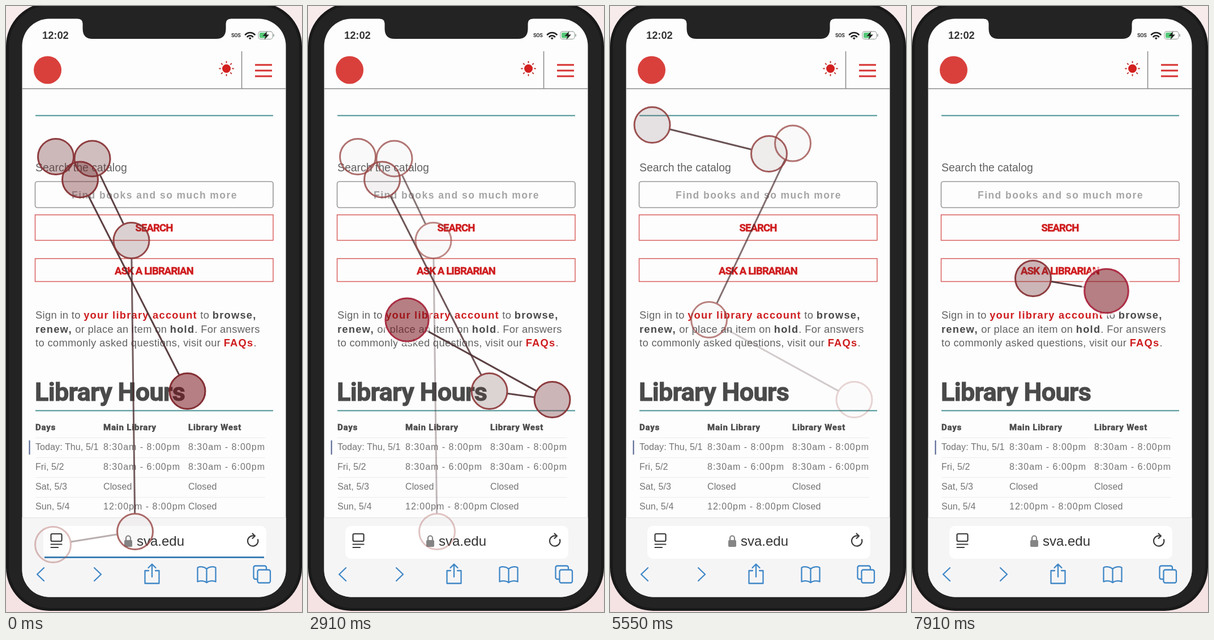
An HTML page for the animation above (8 s loop, 523 by 1070 pixels).

```html
<!DOCTYPE html>
<html lang="en">
<head>
<meta charset="utf-8">
<title>Library page gaze path</title>
<style>
  html, body { margin: 0; width: 100%; height: 100%; overflow: hidden; background: #f6e6e7; }
  svg { display: block; width: 523px; height: 1070px; }
  text { font-family: "Liberation Sans", Arial, sans-serif; fill: #626262; }
  .b { font-weight: 700; }
  .mid { text-anchor: middle; }
  .red { fill: #cf1d1f; }
  .dark { fill: #4a4a4a; }
  .slab { font-family: Roboto, "Liberation Sans", sans-serif; font-weight: 700; stroke-width: .5px; }
  .slab.red { stroke: #cf1d1f; }
  .slab.dark { stroke: #4a4a4a; }
  .title { font-size: 45px; letter-spacing: -.7px; stroke-width: 1px; }
  .button { font-size: 18.5px; letter-spacing: -.85px; }
  .copy { font-size: 18.3px; letter-spacing: .35px; }
  .copy .b { letter-spacing: 1.25px; }
  .head { font-size: 15px; letter-spacing: .8px; }
  .row { font-size: 16px; letter-spacing: 1px; fill: #747474; }
  .row .day, .row .shut { letter-spacing: .1px; }
  .line { fill: none; stroke-linecap: round; stroke-linejoin: round; }
  .blue { stroke: #3f87c6; stroke-width: 2.3; }
  .load { animation: load 8s infinite step-end; }
  @keyframes load { 0% { opacity: 1 } 11.3%, 100% { opacity: 0 } }
</style>
</head>
<body>
<svg viewBox="0 0 523 1070">
  <defs>
    <linearGradient id="bg" x2="0" y2="1">
      <stop offset="0" stop-color="#f8ebec"/><stop offset="1" stop-color="#f5e2e3"/>
    </linearGradient>
    <clipPath id="screen"><rect x="28.500" y="22.500" width="466" height="1021" rx="48"/></clipPath>
  </defs>

  <!-- phone -->
  <rect width="523" height="1070" fill="url(#bg)"/>
  <rect x="0" y="-6" width="523" height="1074" rx="77" fill="#191919"/>
  <rect x="5" y="-1" width="513" height="1064" rx="72" fill="#232323"/>
  <g clip-path="url(#screen)">
    <rect x="28" y="22" width="467" height="1022" fill="#fdfdfd"/>
    <path d="M28 146H495M416.500 80V146" fill="none" stroke="#8d8d8d" stroke-width="1.6"/>

    <!-- page -->
    <circle cx="73.500" cy="113" r="24.500" fill="#d9403c"/>
    <circle cx="389.500" cy="110.500" r="7.500" fill="#d3201f"/>
    <g id="rays" stroke="#bd3a36" stroke-width="2" stroke-linecap="round"></g>
    <path d="M440 104h30M440 114h30M440 124h30" fill="none" stroke="#d6302f" stroke-width="3"/>
    <path d="M52 193.500H472M52 714.500H472" fill="none" stroke="#4b9293" stroke-width="2"/>

    <text x="52" y="292" font-size="19.400">Search the catalog</text>
    <rect x="51.500" y="310" width="420.500" height="46" rx="4" fill="none" stroke="#9b9b9b" stroke-width="1.700"/>
    <text class="b mid" x="262.500" y="340" font-size="17.500" letter-spacing="1.450" style="fill:#a5a5a5">Find books and so much more</text>
    <g fill="none" stroke="#d8625f" stroke-width="1.500">
      <rect x="51.500" y="368.700" width="420.500" height="45"/>
      <rect x="51.500" y="446" width="420.500" height="40.500"/>
    </g>
    <g class="mid button">
      <text class="slab red" x="261.500" y="397.500">SEARCH</text>
      <text class="slab red" x="261.500" y="474">ASK A LIBRARIAN</text>
    </g>

    <g class="copy">
      <text x="52" y="552">Sign in to <tspan class="b red">your library account</tspan> to <tspan class="b dark">browse,</tspan></text>
      <text x="52" y="577"><tspan class="b dark">renew,</tspan> or place an item on <tspan class="b dark">hold</tspan>. For answers</text>
      <text x="52" y="601">to commonly asked questions, visit our <tspan class="b red">FAQs</tspan>.</text>
    </g>

    <text class="slab dark title" x="51" y="697">Library Hours</text>
    <g class="head">
      <text class="slab dark" x="52" y="749">Days</text>
      <text class="slab dark" x="172" y="749">Main Library</text>
      <text class="slab dark" x="322" y="749">Library West</text>
    </g>
    <path d="M52 762.500H458M52 797.500H458M52 832.500H458M52 867.500H458" fill="none" stroke="#ececec"/>
    <path d="M41.500 767V792" fill="none" stroke="#50608f" stroke-width="2"/>
    <g id="hours"></g>

    <!-- browser bar -->
    <rect x="28" y="903" width="467" height="141" fill="#f6f5f6"/>
    <path d="M28 903.500H495" fill="none" stroke="#e2e2e2"/>
    <rect x="66" y="918" width="394" height="58" rx="10" fill="#fff"/>
    <path class="load" d="M68 973.500H456" fill="none" stroke="#3c7fb4" stroke-width="3"/>
    <g class="line" stroke="#3c3c3c" stroke-width="2.200">
      <rect x="79.500" y="932" width="19" height="13" rx="2"/>
      <path d="M79.500 950.500H98.500M79.500 956H92"/>
      <path d="M438 935.500A9.200 9.200 0 1 0 445 942M435.500 931.500L440 935.700L435.500 940"/>
    </g>
    <rect x="209" y="943" width="14" height="12" rx="2" fill="#858585"/>
    <path class="line" d="M212 943V939.500a4 4 0 0 1 8 0V943" stroke="#858585" stroke-width="2.200"/>
    <text x="231" y="953" font-size="24" style="fill:#333">sva.edu</text>
    <g class="line blue">
      <path d="M67 992L55 1003.500L67 1015M156 992L168 1003.500L156 1015"/>
      <path d="M252 997H245.500V1019.500H270.500V997H264M258 1008V986M251.500 992L258 985.500L264.500 992"/>
      <path d="M354.500 994C350 989.500 343 989.500 338.500 991.500V1016.500C343 1014.500 350 1014.500 354.500 1018C359 1014.500 366 1014.500 370.500 1016.500V991.500C366 989.500 359 989.500 354.500 994V1018"/>
      <path d="M444 1012H440.500a3 3 0 0 1-3-3V991.500a3 3 0 0 1 3-3H457a3 3 0 0 1 3 3V995"/>
      <rect x="444.500" y="995.500" width="22.500" height="23" rx="3"/>
    </g>

    <!-- status bar -->
    <text class="b" x="64" y="58" font-size="18.300" style="fill:#333">12:02</text>
    <text class="slab" x="398" y="55" font-size="9" letter-spacing="-.3" style="fill:#333">SOS</text>
    <g class="line" stroke="#222" stroke-width="2.700" stroke-linecap="butt">
      <path d="M423 50.500a11.500 11.500 0 0 1 16.500 0M426.500 54.200a6.700 6.700 0 0 1 9.500 0"/>
    </g>
    <path d="M428.700 56.500a3.800 3.800 0 0 1 5 0L431.200 59.500Z" fill="#222"/>
    <rect x="446" y="45" width="25" height="13.500" rx="4" fill="#fff" stroke="#a9b2ac" stroke-width="1.300"/>
    <rect x="448" y="47" width="13" height="9.500" rx="2" fill="#55c878"/>
    <path d="M473 49.500v4.500" stroke="#a9b2ac" stroke-width="2"/>
    <path d="M461.500 44.500L453.500 53H458.500L456.500 59.500L465 50.500H459.700Z" fill="#222"/>
  </g>
  <path d="M127 18V22.500Q135.500 23 135.500 31V40Q135.500 58 153 58H371Q388.500 58 388.500 40V31Q388.500 23 397 22.500V18Z" fill="#232323"/>

  <g id="links" stroke="#4b2d30" stroke-width="3"></g>
  <g id="spots"></g>
</svg>
<script>
const LOOP = 8000, RADIUS = 31.5, POP = 300;
const $ = id => document.getElementById(id);

function add(parent, tag, attrs, text) {
  const el = document.createElementNS('http://www.w3.org/2000/svg', tag);
  set(el, attrs);
  if (text) el.textContent = text;
  return parent.appendChild(el);
}
function set(el, attrs) {
  for (const key in attrs) el.setAttribute(key, attrs[key]);
}
const clamp = v => Math.max(0, Math.min(1, v));
const blend = (a, b, p) => a.map((v, i) => Math.round(v + (b[i] - v) * p));
const rgb = c => `rgb(${c})`;

for (let i = 0; i < 8; i++) {
  const c = Math.cos(i * Math.PI / 4), s = Math.sin(i * Math.PI / 4);
  add($('rays'), 'line', {
    x1: 389.5 + c * 10.5, y1: 110.5 + s * 10.5, x2: 389.5 + c * 12.5, y2: 110.5 + s * 12.5
  });
}

[
  ['Today: Thu, 5/1', '8:30am - 8:00pm', '8:30am - 8:00pm'],
  ['Fri, 5/2', '8:30am - 6:00pm', '8:30am - 6:00pm'],
  ['Sat, 5/3', 'Closed', 'Closed'],
  ['Sun, 5/4', '12:00pm - 8:00pm', 'Closed']
].forEach((cells, r) => {
  const row = add($('hours'), 'g', { class: 'row' });
  cells.forEach((cell, c) => add(row, 'text', {
    x: [52, 172, 322][c], y: 784 + r * 35, style: 'fill:#747474',
    class: c === 0 ? 'day' : cell === 'Closed' ? 'shut' : ''
  }, cell));
});

// x, y, appearance in ms, start of fading on the fade clock in seconds
const gaze = [
  [83, 951, -999, -3.1], [228, 928, -999, -1.95], [221.5, 414, -999, -1.2],
  [152.5, 269.5, -999, -.9], [88, 266, -999, -.8], [131, 306.5, -999, -.6],
  [320.5, 680, -999, 0], [431.5, 695, 2000, .5], [175, 554, 2800, 1.55],
  [323, 242.5, 3250, 1.75], [281, 261, 3600, 2.15], [74.5, 210, 3850, 2.4],
  [214, 481, 6850, 5.5], [343.5, 503, 7820, 6.3]
].map(([x, y, born, fade], i) => ({
  x, y, born, fade,
  link: i && add($('links'), 'line', {}),
  halo: add($('spots'), 'circle', { cx: x, cy: y, fill: 'none', stroke: '#fff', 'stroke-width': 4 }),
  disc: add($('spots'), 'circle', { cx: x, cy: y, 'stroke-width': 3 })
}));

// fading nearly rests while the gaze dwells at the start
const fadeClock = t => t < 1.85 ? .1 * t : t - 1.665;
const strength = age => 1 - clamp((age - .9) / 2.9) ** 2;

function drawLink(a, b) {
  const dx = b.x - a.x, dy = b.y - a.y, d = Math.hypot(dx, dy);
  const shown = b.shown && d > a.r + b.r;
  set(b.link, {
    x1: a.x + dx / d * (a.r + 1), y1: a.y + dy / d * (a.r + 1),
    x2: b.x - dx / d * (b.r + 1), y2: b.y - dy / d * (b.r + 1),
    opacity: shown ? .9 * strength(a.age) : 0
  });
}

function draw(ms) {
  const now = fadeClock(ms / 1000);
  gaze.forEach((spot, i) => {
    const pop = clamp((ms - spot.born) / POP);
    spot.shown = ms >= spot.born;
    spot.age = Math.max(0, now - spot.fade);
    spot.r = RADIUS + 10.5 * (1 - pop);
    const ring = blend([124, 34, 40], [165, 88, 82], clamp(spot.age / 3));
    set(spot.disc, {
      r: spot.r,
      fill: rgb(blend([118, 16, 24], [105, 75, 75], clamp(spot.age / 1.5))),
      'fill-opacity': .5 * clamp(1 - spot.age / 2) + .03 * strength(spot.age),
      stroke: rgb(blend([190, 35, 68], ring, pop)),
      'stroke-opacity': .92 * strength(spot.age),
      opacity: +spot.shown
    });
    set(spot.halo, { r: spot.r + 3.5, opacity: spot.shown ? .9 * (1 - pop) : 0 });
    if (i) drawLink(gaze[i - 1], spot);
  });
}

function tick() {
  draw(performance.now() % LOOP);
  requestAnimationFrame(tick);
}
tick();
</script>
</body>
</html>
```
